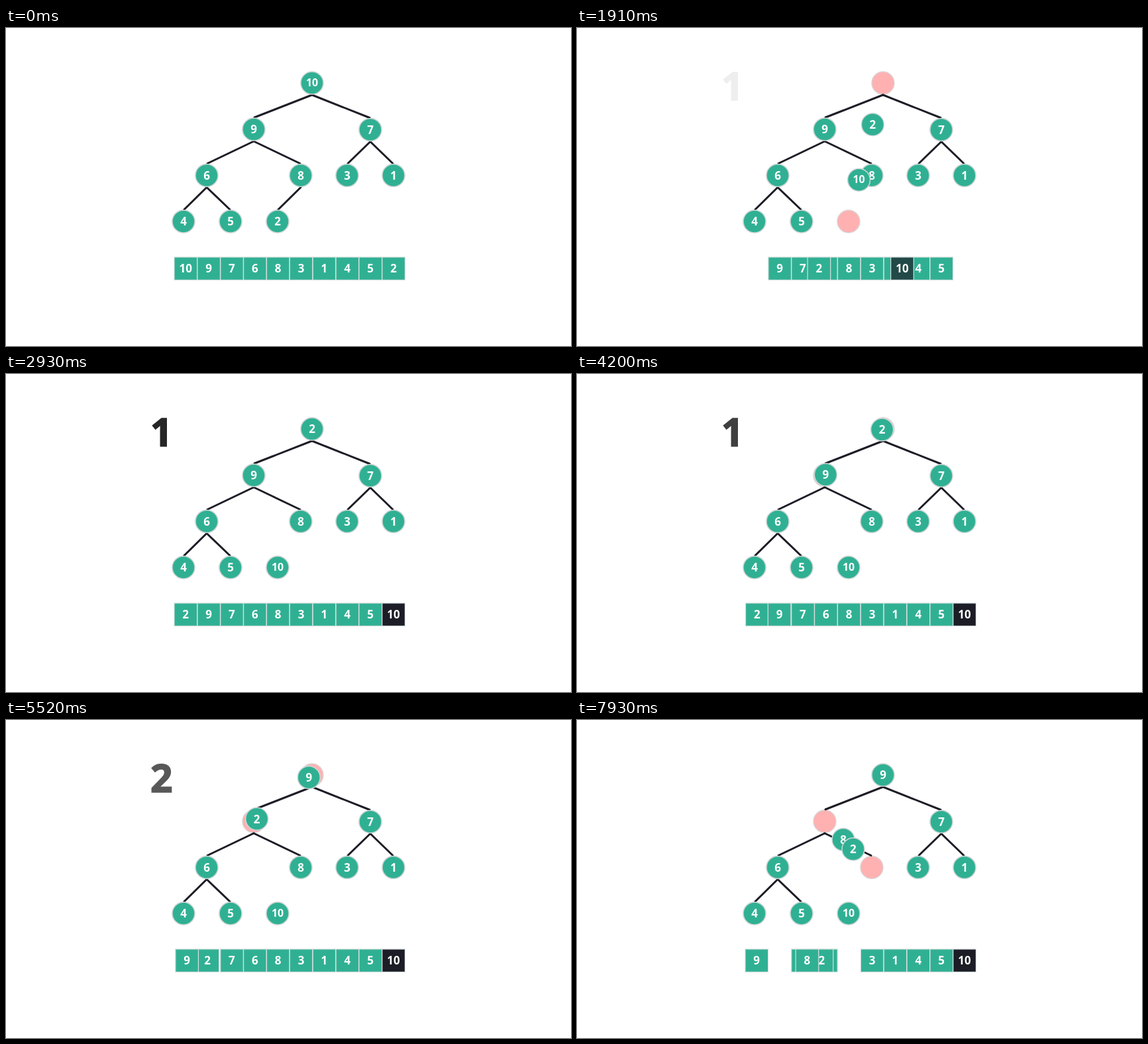
These frames come from a looping animation (853x480 px, 7990 ms). An HTML page:

```html
<!DOCTYPE html>
<html lang="en">
<head>
<meta charset="utf-8">
<title>Heap sort</title>
<style>
  html, body { margin: 0; width: 100%; height: 100%; overflow: hidden; background: #fff; }
  svg { display: block; width: 853px; height: 480px; }
  text { font-family: "Open Sans", "Noto Sans", sans-serif; font-weight: 700; }
  .edge { stroke: #1d1d26; stroke-width: 3; stroke-linecap: round; }
  .hole { fill: #ffb1b2; stroke: #dcd3d3; stroke-width: 1.4; }
  .node circle { fill: #30b093; stroke: #cfd8d7; stroke-width: 1.5; }
  .cell rect { fill: #30b093; stroke: #d6e0de; stroke-width: 1.2; }
  .node text, .cell text { fill: #fff; font-size: 17px; text-anchor: middle; }
  .step { fill: #262626; stroke: #262626; stroke-width: 1.6; font-size: 58.5px; }
</style>
</head>
<body>
<svg id="stage" viewBox="0 0 853 480"></svg>
<script>
const LOOP = 7990, START = 1130, PERIOD = 3070, TICK = 60, TICKS = 31;

const start = [10, 9, 7, 6, 8, 3, 1, 4, 5, 2];
const slots = [[462, 83], [374, 153], [550, 153.5], [303, 222.5], [445, 222.5],
               [515, 222.5], [585, 222.5], [268, 292], [339, 292], [410, 292]];
const swaps = [[0, 9], [0, 1], [1, 4]];
const stacking = [6, 8, 3, 1, 4, 5, 10, 7, 9, 2];
const green = [48, 176, 147], black = [28, 29, 38];

const stage = document.getElementById('stage');

function add(parent, tag, attrs, text) {
  const el = document.createElementNS('http://www.w3.org/2000/svg', tag);
  for (const key in attrs) el.setAttribute(key, attrs[key]);
  if (text !== undefined) el.textContent = text;
  return parent.appendChild(el);
}

const clamp = v => Math.max(0, Math.min(1, v));
const lerp = (a, b, p) => a + (b - a) * p;
const cellX = i => 271.2 + 34.87 * i;

// Cubic Bezier easing, solved for x by bisection
function ease(x) {
  if (x <= 0 || x >= 1) return clamp(x);
  const curve = (s, a, b) => 3 * (1 - s) * (1 - s) * s * a + 3 * (1 - s) * s * s * b + s * s * s;
  let lo = 0, hi = 1;
  for (let i = 0; i < 24; i++) {
    const mid = (lo + hi) / 2;
    if (curve(mid, .25, .33) < x) lo = mid; else hi = mid;
  }
  return curve(lo, .08, 1);
}

slots.forEach(([x, y]) => add(stage, 'circle', { class: 'hole', cx: x, cy: y, r: 17 }));

let lastEdge;
for (let i = 1; i < slots.length; i++) {
  const [px, py] = slots[(i - 1) >> 1], [x, y] = slots[i];
  lastEdge = add(stage, 'line', { class: 'edge', x1: px, y1: py + 18, x2: x + Math.sign(px - x), y2: y - 18 });
}

const digits = [1, 2].map(n => add(stage, 'text', { class: 'step', x: 218, y: 109.3 }, n));
const nodeLayer = add(stage, 'g', {});
const cellLayer = add(stage, 'g', {});
const nodes = {}, cells = {};

for (const value of stacking) {
  const node = nodes[value] = add(nodeLayer, 'g', { class: 'node' });
  add(node, 'circle', { r: 17 });
  add(node, 'text', value === 10 ? { y: 5, style: 'font-size:16px' } : { y: 6.3 }, value);

  const cell = cells[value] = add(cellLayer, 'g', { class: 'cell' });
  add(cell, 'rect', { x: -17.2, y: 345.9, width: 34.6, height: 34.5 });
  add(cell, 'text', { y: 369 }, value);
}

function place(value, from, to, p) {
  const [x1, y1] = slots[from], [x2, y2] = slots[to];
  nodes[value].setAttribute('transform', `translate(${lerp(x1, x2, p)} ${lerp(y1, y2, p)})`);
  cells[value].setAttribute('transform', `translate(${lerp(cellX(from), cellX(to), p)} 0)`);
}

// The cell travelling left passes over the others
function restack(rising) {
  for (const value of stacking) cellLayer.appendChild(cells[value]);
  if (rising) cellLayer.appendChild(cells[rising]);
}

let shownTurn = null;

function draw(time) {
  const turn = Math.floor((time - START) / PERIOD);
  const ticks = Math.floor((time - START - turn * PERIOD) / TICK) + 1;
  const x = turn < 0 ? 0 : clamp(ticks / TICKS);
  const p = ease(x);

  const order = start.slice();
  for (let i = 0; i < turn; i++) {
    const [a, b] = swaps[i];
    [order[a], order[b]] = [order[b], order[a]];
  }
  const [a, b] = turn < 0 ? [0, 0] : swaps[turn];
  order.forEach((value, i) => place(value, i, i === a ? b : i === b ? a : i, p));

  if (turn !== shownTurn) {
    restack(turn < 0 ? null : order[b]);
    shownTurn = turn;
  }

  const sorted = turn < 0 ? 0 : turn === 0 ? p : 1;
  const mix = green.map((c, i) => Math.round(lerp(c, black[i], sorted)));
  cells[10].firstChild.style.fill = `rgb(${mix})`;

  const fadeIn = clamp((x - .42) / .42), fadeOut = 1 - clamp(x / .27);
  lastEdge.style.opacity = turn < 0 ? 1 : turn === 0 ? fadeOut : 0;
  digits.forEach((el, i) => {
    el.style.opacity = turn === i ? fadeIn : turn === i + 1 ? fadeOut : 0;
  });
}

function frame() {
  draw(performance.now() % LOOP);
  requestAnimationFrame(frame);
}
frame();
</script>
</body>
</html>
```
